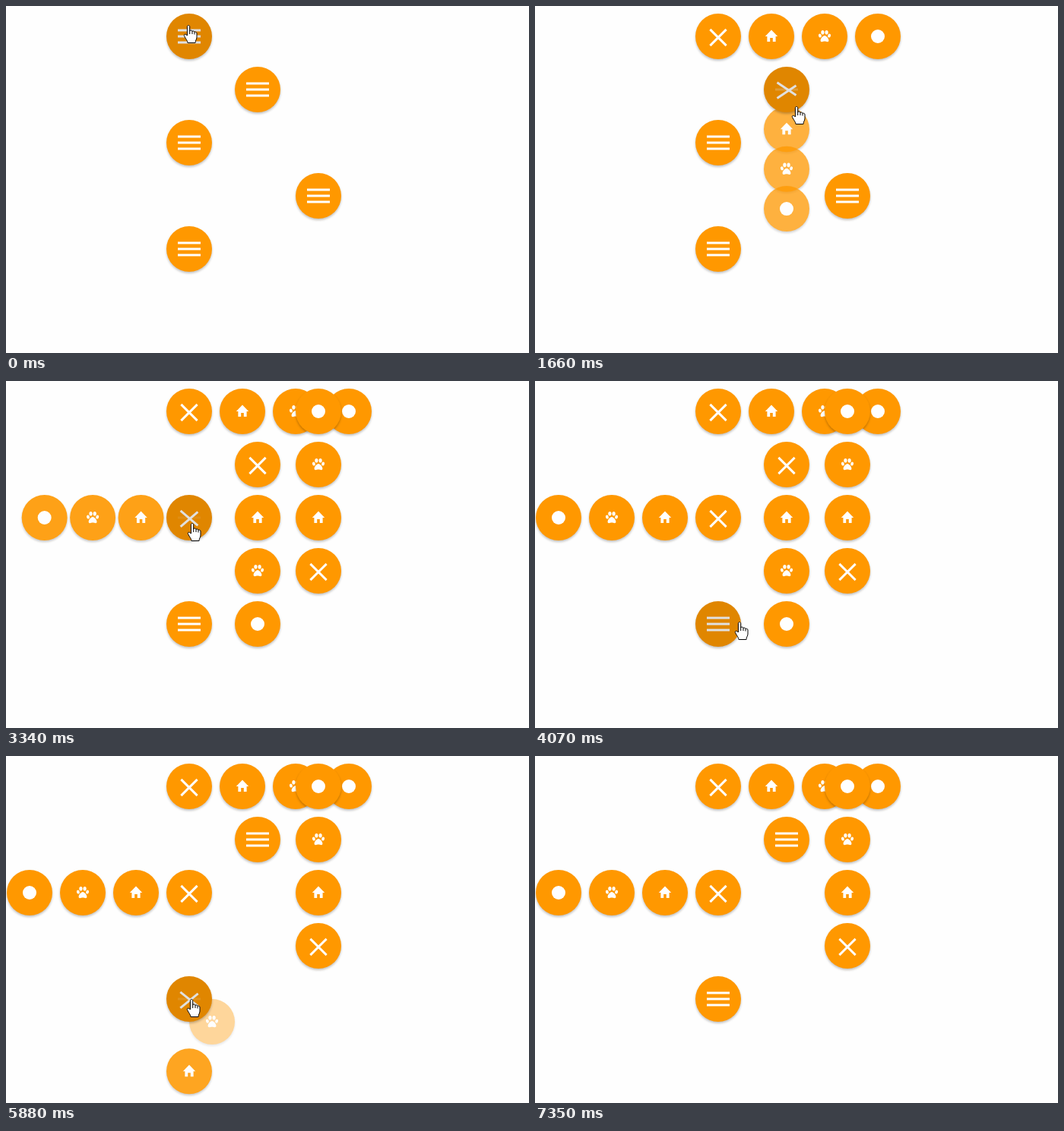
An HTML page that plays this animation: 688x457 px, repeating every 7.57 s.

```html
<!DOCTYPE html>
<html lang="en">
<head>
<meta charset="utf-8">
<title>Floating menus</title>
<style>
  html, body { margin: 0; width: 100%; height: 100%; overflow: hidden; background: #fefefe; }
  svg { display: block; width: 100vw; height: 100vh; }
  .disc { fill: #ff9800; filter: drop-shadow(0 2px 1.5px rgba(0, 0, 0, .24)); }
  .icon { fill: #fff; }
  .shade { fill: #000; fill-opacity: .12; }
  .pointer { fill: #fff; stroke: #000; stroke-linejoin: round; }
</style>
</head>
<body>
<svg id="stage" viewBox="0 0 688 457">
  <defs>
    <path id="home" d="M0-8.5L8.2 0H5.6V7H1.8V2H-1.8V7H-5.6V0H-8.2Z"/>
    <g id="paw">
      <ellipse cx="-2.6" cy="-5.3" rx="2.1" ry="2.8"/>
      <ellipse cx="2.6" cy="-5.3" rx="2.1" ry="2.8"/>
      <ellipse cx="-6.1" cy="-.9" rx="1.9" ry="2.5" transform="rotate(-20 -6.1 -.9)"/>
      <ellipse cx="6.1" cy="-.9" rx="1.9" ry="2.5" transform="rotate(20 6.1 -.9)"/>
      <path d="M0-1C2.4-1 5.4 3 5.4 5.3C5.4 8.6 2.2 6.6 0 6.6S-5.4 8.6-5.4 5.3C-5.4 3-2.4-1 0-1Z"/>
    </g>
    <circle id="dot" r="9"/>
  </defs>
</svg>
<script>
const LOOP = 7570, SPEED = 300, R = 30;
const stage = document.getElementById('stage');

function add(parent, tag, attrs = {}) {
  const el = document.createElementNS('http://www.w3.org/2000/svg', tag);
  for (const key in attrs) el.setAttribute(key, attrs[key]);
  return parent.appendChild(el);
}

const clamp = v => Math.max(0, Math.min(1, v));
const mix = (a, b, p) => a + (b - a) * p;

// cubic-bezier(.25, .1, .25, 1)
function ease(x) {
  if (x <= 0 || x >= 1) return clamp(x);
  let lo = 0, hi = 1;
  const axis = (s, a, b) => 3 * s * (1 - s) ** 2 * a + 3 * s * s * (1 - s) * b + s ** 3;
  for (let i = 0; i < 20; i++) {
    const mid = (lo + hi) / 2;
    if (axis(mid, .25, .25) < x) lo = mid; else hi = mid;
  }
  return axis(lo, .1, 1);
}

// The picture advances in bursts of 120 ms steps with pauses between
const beats = [0, 240, 450];
for (const [start, count] of [[820, 19], [3220, 5], [4070, 5], [4920, 6], [5760, 5], [6730, 6]])
  for (let i = 0; i < count; i++) beats.push(start + i * 120);
const snap = t => beats.filter(b => b <= t).pop();

const line = (dx, dy) => [1, 2, 3].map(n => [dx * n, dy * n]);
const arc = r => [90, 45, 0].map(a => a * Math.PI / 180).map(a => [r * Math.cos(a), r * Math.sin(a)]);

const menus = [
  { x: 241, y: 40, spots: line(70, 0), open: 740 },
  { x: 331, y: 110, spots: line(0, 70), open: 1525, shut: 4890 },
  { x: 241, y: 180, spots: line(-70, 0), open: 3150 },
  { x: 411, y: 250, spots: line(0, -70), open: 2270 },
  { x: 241, y: 320, spots: arc(110), open: 5708, shut: 6690, lag: 100 }
];

function makeButton() {
  const g = add(stage, 'g');
  add(g, 'circle', { class: 'disc', r: R });
  const icon = add(g, 'g', { class: 'icon' });
  const shade = add(g, 'circle', { class: 'shade', r: R });
  return { g, icon, shade, x: 0, y: 0, p: 1 };
}

for (const menu of menus) {
  menu.items = ['home', 'paw', 'dot'].map(name => {
    const button = makeButton();
    add(button.icon, 'use', { href: '#' + name });
    return button;
  });
  menu.toggle = makeButton();
  menu.bars = [0, 1, 2].map(() => add(menu.toggle.icon, 'rect', { x: -15, y: -1.5, width: 30, height: 3 }));
}
const buttons = menus.flatMap(m => [...m.items, m.toggle]);

const arrow = add(stage, 'path', { class: 'pointer', d: 'M.5.5V16.5L4.3 13L6.8 18.8L9.4 17.7L6.9 12H11.8Z' });
const hand = add(stage, 'g', { class: 'pointer' });
add(hand, 'path', {
  d: 'M-1.6 14V2.2C-1.6 0 1.7 0 1.7 2.2V8C2 6.5 5 6.7 5 8.7C5.3 7.4 8 7.7 8 9.7' +
     'C8.5 8.6 11 9 11 11V16C11 19 9 20 9 23.5H-1C-1 21-3.5 18.5-5.5 14.5C-6.5 12-3.5 11.2-1.6 14Z'
});
add(hand, 'path', { d: 'M1.7 8V12M5 8.7V12M8 9.7V12.5', fill: 'none' });

// time, x, y of the pointer tip
const route = [
  [0, 240, 25], [240, 240, 28], [450, 239, 31], [1060, 239, 31], [1540, 342, 128],
  [1660, 344, 132], [1800, 344, 132], [2200, 408, 252], [2380, 406, 251], [2620, 275, 230],
  [2980, 245, 187], [3360, 245, 187], [3700, 265, 311], [4070, 269, 317], [4100, 269, 317],
  [4550, 326, 113], [5100, 326, 113], [5520, 244, 320], [6960, 244, 320], [7230, 602, 430],
  [7350, 760, 480], [LOOP, 760, 480]
];

function pointerAt(t) {
  const i = Math.max(1, route.findIndex(k => k[0] >= t));
  const [t0, x0, y0] = route[i - 1], [t1, x1, y1] = route[i];
  const p = clamp((t - t0) / (t1 - t0)), s = p * p * (3 - 2 * p);
  return [mix(x0, x1, s), mix(y0, y1, s)];
}

function progress(menu, t, delay = 0, lead = 0) {
  const run = start => ease((t - start - delay) / SPEED);
  return run(menu.open) - (menu.shut ? run(menu.shut - lead) : 0);
}

function place(button, x, y, p) {
  Object.assign(button, { x, y, p });
  button.g.setAttribute('transform', `translate(${x} ${y})`);
  button.g.setAttribute('opacity', p);
}

function drawMenu(menu, t) {
  const { x, y, spots, lag = 0 } = menu;
  menu.items.forEach((item, i) => {
    const p = progress(menu, t, i * lag);
    place(item, x + spots[i][0] * p, y + spots[i][1] * p, p);
  });
  place(menu.toggle, x, y, 1);
  const p = progress(menu, t, 0, 25);
  [-1, 0, 1].forEach((side, i) => {
    const shift = side ? mix(8 * side, 1.5, p) : 0;
    menu.bars[i].setAttribute('transform', `translate(0 ${shift}) rotate(${-45 * side * p})`);
  });
  menu.bars[1].setAttribute('opacity', 1 - p);
}

function draw(t) {
  menus.forEach(menu => drawMenu(menu, t));
  const [x, y] = pointerAt(t);
  const over = buttons.filter(b => b.p > .3 && Math.hypot(b.x - x, b.y - y) < R).pop();
  for (const b of buttons) b.shade.setAttribute('visibility', b === over ? 'visible' : 'hidden');
  for (const [el, shown] of [[hand, over], [arrow, !over]]) {
    el.setAttribute('transform', `translate(${Math.round(x)} ${Math.round(y)})`);
    el.setAttribute('visibility', shown ? 'visible' : 'hidden');
  }
}

const begin = performance.now();
function tick() {
  draw(snap((performance.now() - begin) % LOOP));
  requestAnimationFrame(tick);
}
tick();
</script>
</body>
</html>
```
